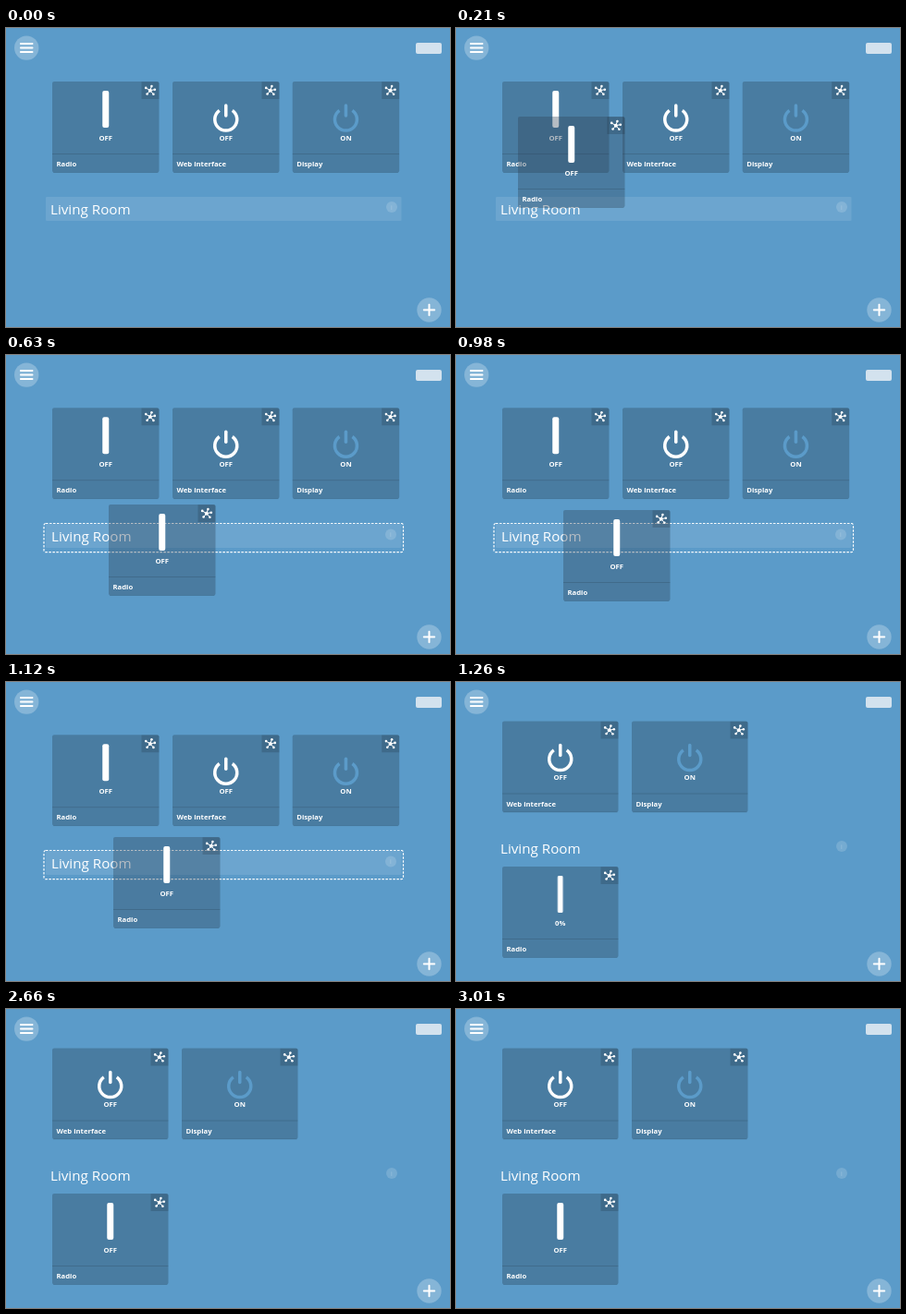
Write an HTML page that moves like this. It is 480 by 324 pixels and loops after 3640 ms.

```html
<!DOCTYPE html>
<html lang="en">
<head>
<meta charset="utf-8">
<title>Dashboard drag and drop</title>
<style>
html, body { margin: 0; width: 100%; height: 100%; overflow: hidden; background: #5b9bc9; }
svg { display: block; width: 480px; height: 324px; font-family: "Open Sans", sans-serif; fill: #fff; }
.bold { font-weight: 700; font-size: 7.7px; }
.mid { text-anchor: middle; }
.room { font-size: 15.2px; }
.line { fill: none; stroke: #fff; stroke-linecap: round; }
</style>
</head>
<body>
<svg id="stage" viewBox="0 0 480 324"></svg>
<script>
const LOOP = 3640, STEP = 70, HOVER = 490, DROP = 1260, SETTLE = 1400;
const BLUE = '#5b9bc9';

// Card position at each step while it is dragged
const path = [[50, 58], [51, 60], [57, 75], [67, 96], [78, 117], [87, 135], [95, 144],
  [102, 151], [108, 157], [111, 162], [113, 165], [115, 167], [116, 168]];

function hub(x, y) {
  const arms = [[-4.6, -2.8], [1.6, -4.6], [5, -1], [3.6, 4], [-3.2, 3.8]];
  return `<g transform="translate(${x} ${y})"><circle r="2"/>` + arms.map(([a, b]) =>
    `<path class="line" d="M0 0L${a} ${b}"/><circle cx="${a}" cy="${b}" r="1.3"/>`).join('') + '</g>';
}

function power(x, color) {
  return `<g class="line" style="stroke:${color}" stroke-width="3.5">
    <path stroke-linecap="butt" d="M${x - 7} 31.3A12 12 0 1 0 ${x + 7} 31.3"/>
    <path d="M${x} 26V37"/></g>`;
}

function bar(x, w = 7) {
  return `<rect x="${x - w / 2}" y="10" width="${w}" height="40" rx="${w > 6 ? 2 : 1}"/>`;
}

function caption(x, text) {
  return `<text class="bold mid" x="${x}" y="63.6">${text}</text>`;
}

function card(id, x, y, w, label, face, fill = 'rgba(0,0,0,.2)') {
  return `<g id="${id}" transform="translate(${x} ${y})">
    <rect width="${w}" height="98.5" rx="2" style="fill:${fill}"/>
    <path d="M0 78.5H${w}M1 98.5H${w - 1}" stroke="#000" stroke-opacity=".13"/>
    <path d="M${w - 19} .3H${w - 2}Q${w} .3 ${w} 2V19H${w - 19}Z" fill="#000" fill-opacity=".14"/>
    ${hub(w - 9.7, 9.7)}${face(w / 2)}
    <text class="bold" x="4.5" y="92">${label}</text></g>`;
}

const off = x => power(x, '#fff') + caption(x, 'OFF');
const on = x => power(x, BLUE) + caption(x, 'ON');
const slider = x => bar(x) + caption(x, 'OFF');
const dropped = x => `<g id="zero"><rect x="${x - 3.5}" y="10" width="7" height="40" rx="2" fill-opacity=".35"/>
  ${bar(x, 5)}${caption(x, '0%')}</g><g id="settled">${slider(x)}</g>`;

function room(x, y) {
  return `<text class="room" x="${x}" y="${y}">Living Room</text>`;
}

function info(x, y) {
  return `<circle cx="${x}" cy="${y}" r="6" fill-opacity=".16"/>
    <text class="mid" x="${x}" y="${y + 2.6}" font-size="7" fill-opacity=".3">i</text>`;
}

function roundButton(x, y, lines) {
  return `<circle cx="${x}" cy="${y}" r="13.2" fill-opacity=".26"/>
    <path class="line" stroke-width="2" transform="translate(${x} ${y})" d="${lines}"/>`;
}

const stage = document.getElementById('stage');
stage.innerHTML = `
  <rect width="480" height="324" fill="${BLUE}"/>
  <g id="before">
    <g id="row">
      ${card('radio', 50, 58, 115.5, 'Radio', slider)}
      ${card('web', 180, 58, 115.5, 'Web interface', off)}
      ${card('display', 309.7, 58, 115.5, 'Display', on)}
    </g>
    <rect x="43" y="183" width="384.5" height="26" rx="1" fill-opacity=".1"/>
    <g id="idle">${room(48, 202)}${info(417, 194)}</g>
    <g id="target">${room(49, 202)}${info(416, 194.5)}
      <rect x="41" y="182.5" width="388.5" height="31.2" rx="2" fill="none" stroke="#fff"
        stroke-width="1.2" stroke-dasharray="2.5 1.5"/></g>
    ${card('drag', 50, 58, 115.5, 'Radio', slider, 'rgba(45,65,85,.35)')}
  </g>
  <g id="after">
    ${card('web2', 50, 42.5, 125.5, 'Web interface', off)}
    ${card('display2', 190, 42.5, 125.5, 'Display', on)}
    ${room(48, 186)}${info(417, 178)}
    ${card('radio2', 50, 200, 125.5, 'Radio', dropped)}
  </g>
  ${roundButton(22.2, 21.6, 'M-6.3 -4.5H6.3M-6.3 0H6.3M-6.3 4.5H6.3')}
  ${roundButton(457.5, 305.5, 'M-5.7 0H5.7M0 -5.7V5.7')}
  <rect x="443" y="16" width="28" height="12" rx="2" fill="#d3e2ee"/>`;

const el = id => document.getElementById(id);
const show = (id, visible) => { el(id).style.display = visible ? '' : 'none'; };

function draw(t) {
  const hover = t >= HOVER;
  const step = Math.min(Math.floor(t / STEP), path.length - 1);
  show('before', t < DROP);
  show('after', t >= DROP);
  show('drag', step > 0);
  show('idle', !hover);
  show('target', hover);
  show('zero', t < SETTLE);
  show('settled', t >= SETTLE);
  el('row').setAttribute('transform', `translate(0 ${hover ? -0.8 : 0})`);
  el('drag').setAttribute('transform', `translate(${path[step].join(' ')})`);
}

const start = performance.now();
function tick() {
  draw((performance.now() - start) % LOOP);
  requestAnimationFrame(tick);
}
tick();
</script>
</body>
</html>
```
